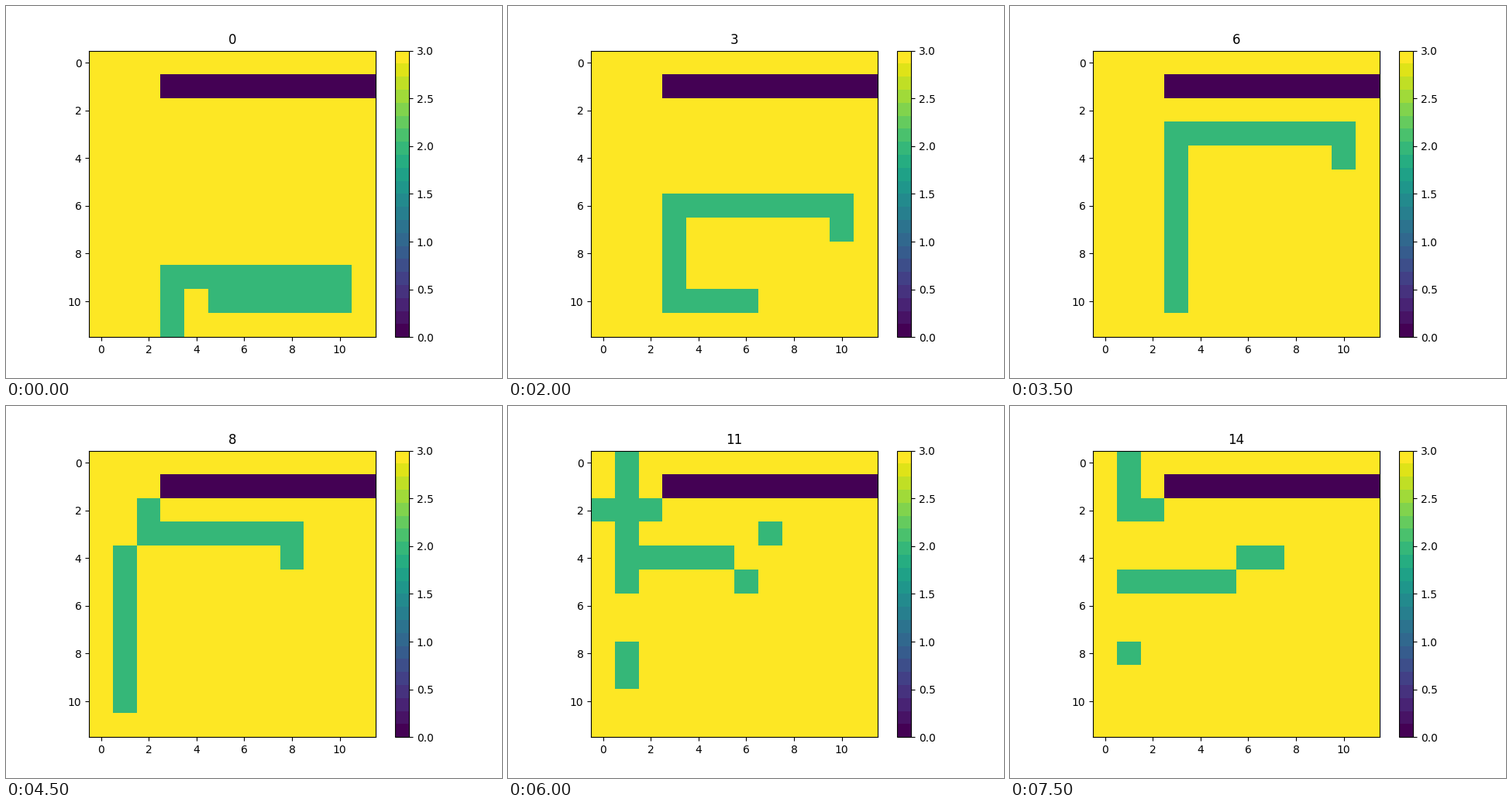
A matplotlib script that plays this animation: 640 by 480 pixels, repeating every 8000 ms.

```python
import matplotlib.pyplot as plt
import numpy as np
from matplotlib.animation import FuncAnimation

SIZE = 12
WALL, AGENT, FREE = 0, 2, 3
LEVELS = 22


def climb(grid, step):
    """The bar rises while the bottom row feeds the left column."""
    top = 9 - step
    grid[top, 3:11] = AGENT
    grid[top + 1, 10] = AGENT
    grid[top:11, 3] = AGENT
    grid[10, 3:10 - step] = AGENT
    if step == 0:  # one agent still waits below the corner
        grid[10, 4] = FREE
        grid[11, 3] = AGENT


def round_wall(grid, step):
    """The bar slides left and its head turns up past the wall."""
    right = 16 - step
    left = max(1, 9 - step)
    grid[3, 2:right + 1] = AGENT
    grid[4, right] = AGENT
    grid[min(4, 12 - step):11 - max(0, step - 8), left] = AGENT
    grid[10 - step:3, 2] = AGENT


def scatter(grid, step):
    """The head column drains upward; the rest sways and breaks apart."""
    sway = (step + 1) % 2
    rebound = abs(step - 12)  # strays drift down, then turn back up
    grid[:17 - step, 1] = AGENT
    grid[2, 2] = AGENT
    grid[4 + sway, 2:6] = AGENT
    grid[3 + sway, 7] = AGENT
    grid[6 - rebound, 6] = AGENT
    grid[10 - rebound, 1] = AGENT
    grid[19 - step, 1] = AGENT
    if step < 13:
        grid[13 - step, 0] = AGENT


def world(step):
    grid = np.full((SIZE, SIZE), FREE)
    grid[1, 3:] = WALL
    phase = climb if step <= 6 else round_wall if step <= 10 else scatter
    phase(grid, step)
    return grid


fig, ax = plt.subplots(figsize=(6.4, 4.8), dpi=100)
image = ax.imshow(world(0), cmap=plt.get_cmap("viridis", LEVELS),
                  vmin=WALL, vmax=FREE)
fig.colorbar(image, ax=ax)
title = ax.set_title("0")


def update(frame):
    step = max(0, frame - 1)  # the opening state is held twice as long
    image.set_data(world(step))
    title.set_text(str(step))
    return image, title


animation = FuncAnimation(fig, update, frames=16, interval=500,
                          repeat=True, repeat_delay=0)
plt.show()
```
